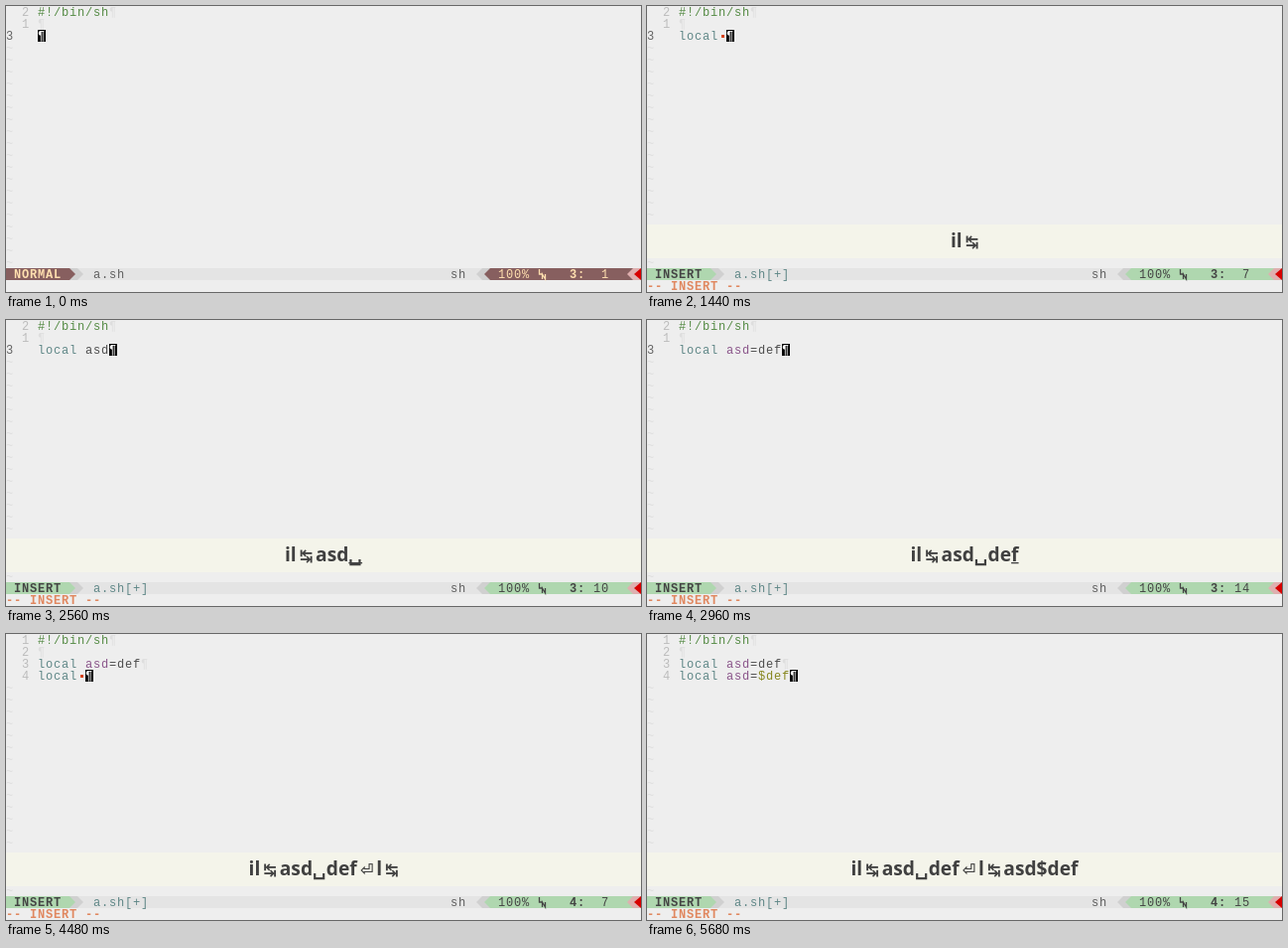
Recreate the animation shown at these times as an HTML page. Size 640 px wide and 288 px high, loop 6000 ms.

```html
<!DOCTYPE html>
<html lang="en">
<head>
<meta charset="utf-8">
<title>Shell editing with snippets</title>
<style>
  html, body { margin: 0; width: 100%; height: 100%; overflow: hidden; background: #eee; }
  svg { display: block; width: 640px; height: 288px; }
  text { white-space: pre; }
  .mono { font: 12px "Liberation Mono", "DejaVu Sans Mono", monospace; letter-spacing: .8px; }
  .bold { font-weight: 700; }
  .keys { font: 700 19.2px "Noto Sans", "DejaVu Sans", sans-serif; fill: #404040; text-anchor: middle; }
  .symbol { font-size: 16px; font-family: "DejaVu Sans", sans-serif; }
</style>
</head>
<body>
<svg id="stage" viewBox="0 0 640 288"></svg>
<script>
const LOOP = 6000, CELL = 8, ROW = 12, GUTTER = 4;
const INK = '#4e4e4e', FAINT = '#dedede', GREY = '#bcbcbc';
const COMMENT = '#558b45', KEYWORD = '#5f8787', NAME = '#8a558a', VALUE = '#87871f', TRAIL = '#d7451f';
const NORMAL = { label: 'NORMAL', bg: '#875f5f', fg: '#ffdfaf' };
const INSERT = { label: 'INSERT', bg: '#afd7af', fg: '#444444' };

const ABSOLUTE_FROM = 4400, RECENT = 160, KEY_GAP = 3;
const DONE = 'local asd=def\n';

// time and key pressed
const presses = [
  [720, 'i'], [1120, 'l'], [1280, '↹'], [1760, 'a'], [1920, 's'], [2080, 'd'],
  [2560, '␣'], [2720, 'd'], [2800, 'e'], [2960, 'f'], [3920, '⏎'],
  [4240, 'l'], [4320, '↹'], [4560, 'a'], [4720, 's'], [4880, 'd'],
  [5040, '$'], [5360, 'd'], [5440, 'e'], [5520, 'f'],
];

// time and text from line 3 on
const edits = [
  [0, ''],
  [1200, 'l'],
  [1360, 'local '],
  [1840, 'local a'],
  [2000, 'local as'],
  [2160, 'local asd'],
  [2640, 'local asd='],
  [2800, 'local asd=d'],
  [2880, 'local asd=de'],
  [2960, 'local asd=def'],
  [4000, DONE],
  [4320, DONE + 'l'],
  [4400, DONE + 'local '],
  [4640, DONE + 'local a'],
  [4720, DONE + 'local as'],
  [4880, DONE + 'local asd'],
  [5120, DONE + 'local asd=$'],
  [5440, DONE + 'local asd=$d'],
  [5520, DONE + 'local asd=$de'],
  [5600, DONE + 'local asd=$def'],
];

const rect = (x, y, w, h, fill) =>
  `<rect x="${x}" y="${y}" width="${w}" height="${h}" fill="${fill}"/>`;
const put = (col, row, str, fill, bold = false) =>
  `<text class="mono${bold ? ' bold' : ''}" x="${col * CELL}" y="${row * ROW + 10}" fill="${fill}">${str}</text>`;
// Status bar arrow from its base to its tip
const arrow = (base, tip, fill) => `<path d="M${base} 264L${tip} 270L${base} 276z" fill="${fill}"/>`;

function codeLine(line, row) {
  const [, word, space, name, eq, value] = line.match(/^(\w*)( ?)(\w*)(=?)(.*)$/);
  const parts = [
    [word, word === 'local' ? KEYWORD : INK],
    [space, INK],
    [name, eq ? NAME : INK],
    [eq, INK],
    [value, /^\$\w/.test(value) ? VALUE : INK],
  ];
  let col = GUTTER, out = '';
  for (const [str, fill] of parts) {
    if (str.trim()) out += put(col, row, str, fill);
    col += str.length;
  }
  if (line.endsWith(' ')) out += rect(col * CELL - 5, row * ROW + 5, 3, 3, TRAIL);
  return out;
}

function buffer(lines, absolute) {
  const last = lines.length - 1;
  let out = '';
  lines.forEach((line, row) => {
    const end = GUTTER + line.length;
    if (absolute) out += put(2, row, row + 1, GREY);
    else if (row === last) out += put(0, row, row + 1, '#666');
    else out += put(2, row, last - row, GREY);

    out += row === 0 ? put(GUTTER, 0, line, COMMENT) : codeLine(line, row);
    if (row === last) out += rect(end * CELL, row * ROW, CELL, ROW, '#000');
    out += put(end, row, '¶', row === last ? '#fff' : FAINT);
  });
  for (let row = lines.length; row <= 21; row++) out += put(0, row, '~', FAINT);
  return out;
}

function statusBar(mode, changed, line, col) {
  const soft = '#d0d0d0', pink = '#dfafaf';
  return rect(0, 264, 640, 12, '#e4e4e4')
    + rect(64, 264, 8, 12, soft) + arrow(72, 78, soft)
    + rect(0, 264, 64, 12, mode.bg) + arrow(64, 70, mode.bg)
    + put(1, 22, mode.label, mode.fg, true)
    + put(11, 22, changed ? 'a.sh[+]' : 'a.sh', changed ? KEYWORD : '#5f5f5f')
    + put(56, 22, 'sh', '#5f5f5f')
    + arrow(480, 474, soft) + rect(480, 264, 8, 12, soft)
    + arrow(488, 482, mode.bg) + rect(488, 264, 144, 12, mode.bg)
    + put(62, 22, '100%', mode.fg)
    + `<path d="M537.5 265v5h3M540.5 275v-5l3 5v-5" fill="none" stroke="${mode.fg}" stroke-width="1.3"/>`
    + put(71, 22, line + ':', mode.fg, true)
    + put(74, 22, String(col).padStart(2), mode.fg)
    + arrow(632, 626, pink) + rect(632, 264, 8, 12, pink) + arrow(640, 633, '#d70000');
}

function keyBand(pressed) {
  const isSymbol = key => key === '↹' || key === '⏎';
  const spans = pressed.map(([, key], i) => {
    const gap = i > 0 && (isSymbol(key) || isSymbol(pressed[i - 1][1]));
    return `<tspan${isSymbol(key) ? ' class="symbol"' : ''} dx="${gap ? KEY_GAP : 0}">${key}</tspan>`;
  });
  return rect(0, 220, 640, 34, '#f4f4ea')
    + `<text class="keys" x="320" y="243">${spans.join('')}</text>`;
}

// The newest key is underlined for a moment
function underline(svg) {
  const key = svg.querySelector('.keys tspan:last-child');
  const end = key.parentNode.getEndPositionOfChar(key.parentNode.getNumberOfChars() - 1).x;
  const width = key.parentNode.getExtentOfChar(key.parentNode.getNumberOfChars() - 1).width;
  svg.insertAdjacentHTML('beforeend', rect(end - width, 244, width, 1.3, '#404040'));
}

function render(svg, pressed, typed, absolute, recent) {
  const lines = ['#!/bin/sh', '', ...typed.split('\n')];
  const col = lines[lines.length - 1].length + 1;
  const inserting = pressed.length > 0;
  svg.innerHTML = rect(0, 0, 640, 288, '#eee')
    + buffer(lines, absolute)
    + statusBar(inserting ? INSERT : NORMAL, typed !== '', lines.length, col)
    + (inserting ? put(0, 23, '-- INSERT --', '#e0875f', true) + keyBand(pressed) : '');
  if (recent) underline(svg);
}

const stage = document.getElementById('stage');
const start = performance.now();
let shown = '';

function tick() {
  const t = (performance.now() - start) % LOOP;
  const pressed = presses.filter(([at]) => at <= t);
  const typed = edits.filter(([at]) => at <= t).pop()[1];
  const recent = pressed.length > 0 && t - pressed[pressed.length - 1][0] < RECENT;
  const state = [pressed.length, typed, recent].join('|');
  if (state !== shown) {
    render(stage, pressed, typed, t >= ABSOLUTE_FROM, recent);
    shown = state;
  }
  requestAnimationFrame(tick);
}
tick();
</script>
</body>
</html>
```
